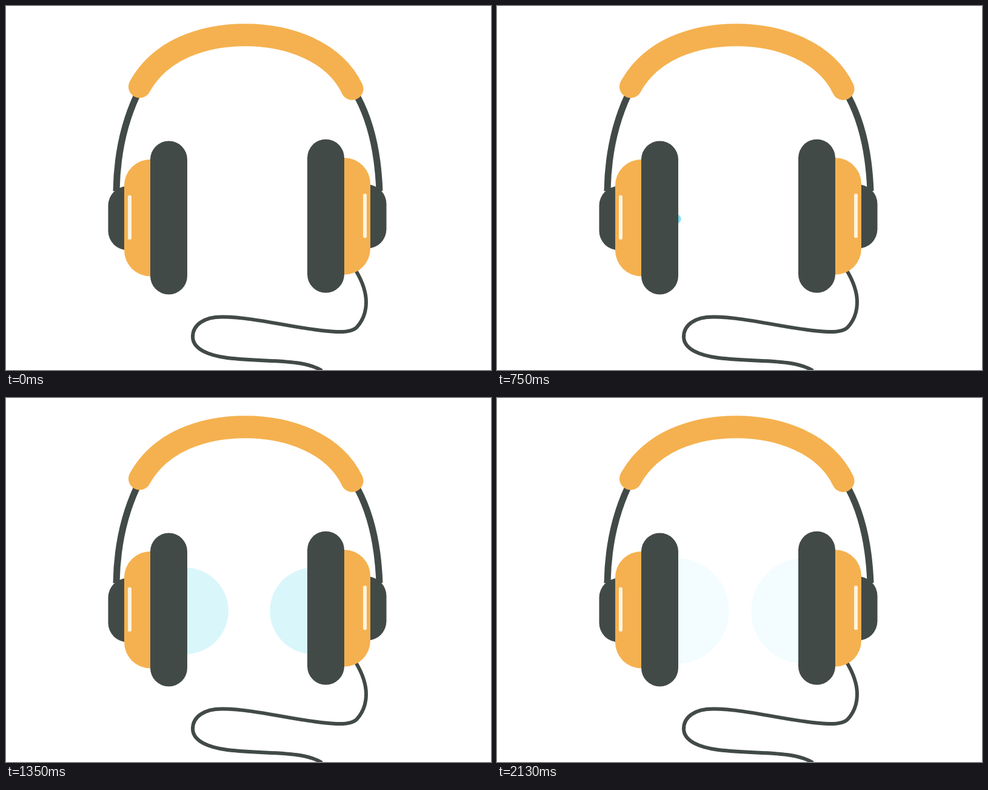
An HTML page that plays this animation: 800x600 px, repeating every 2.19 s.

```html
<!DOCTYPE html>
<html lang="en">
<head>
<meta charset="utf-8">
<title>Headphones</title>
<style>
  html, body { margin: 0; width: 100%; height: 100%; overflow: hidden; background: #fff; }
  svg { display: block; width: 800px; height: 600px; }
  .dark { fill: #424a48; }
  .wire { fill: none; stroke: #424a48; }
</style>
</head>
<body>
<svg viewBox="0 0 800 600">
  <defs>
    <g id="cup">
      <rect class="dark" x="168.5" y="297" width="80" height="105.5" rx="32"/>
      <rect x="195" y="253" width="90" height="192.5" rx="43" fill="#f5b14f"/>
      <rect class="dark" x="238" y="222.5" width="61" height="253" rx="30.5"/>
      <rect x="201" y="312" width="6" height="73" rx="2.5" fill="#fdf3dc"/>
    </g>
  </defs>
  <g fill="#69dcf0">
    <circle class="pulse" cx="295.6" cy="351"/>
    <circle class="pulse" cx="506.5" cy="351"/>
  </g>
  <path class="wire" stroke-width="11" d="M216 147C196 190 183 245 182 305M580 150C604 195 614 250 616 305"/>
  <path class="wire" stroke-width="6" d="M577 436C589 456 594 472 594 488C594 507 588 519 579 529C572 537 557 537.5 545 537C490 535 415 513 358 512.5C326 512 308 526 308 545C308 566 335 576 365 580C415 586 450 583 485 589C500 591.5 511 595 521 601"/>
  <path fill="none" stroke="#f5b14f" stroke-width="37" stroke-linecap="round" d="M220.5 133C254 72 325 47.7 395 47.7S541 74 571 136.5"/>
  <use href="#cup"/>
  <use href="#cup" transform="matrix(-1 0 0 1 796 -2.7)"/>
</svg>
<script>
  const STEP = 30, LOOP = 2190, BEAT = 12, RADIUS = 95;
  const pulses = document.querySelectorAll('.pulse');
  const start = performance.now();

  function draw(now) {
    const step = Math.floor(Math.max(0, now - start) % LOOP / STEP);
    // Each beat grows and fades, holding its last visible size for one extra step.
    const grown = step ? Math.min((step - 1) % BEAT + 1, BEAT - 1) / BEAT : 0;
    for (const pulse of pulses) {
      pulse.setAttribute('r', RADIUS * grown);
      pulse.setAttribute('opacity', 1 - grown);
    }
    requestAnimationFrame(draw);
  }
  draw(start);
</script>
</body>
</html>
```
